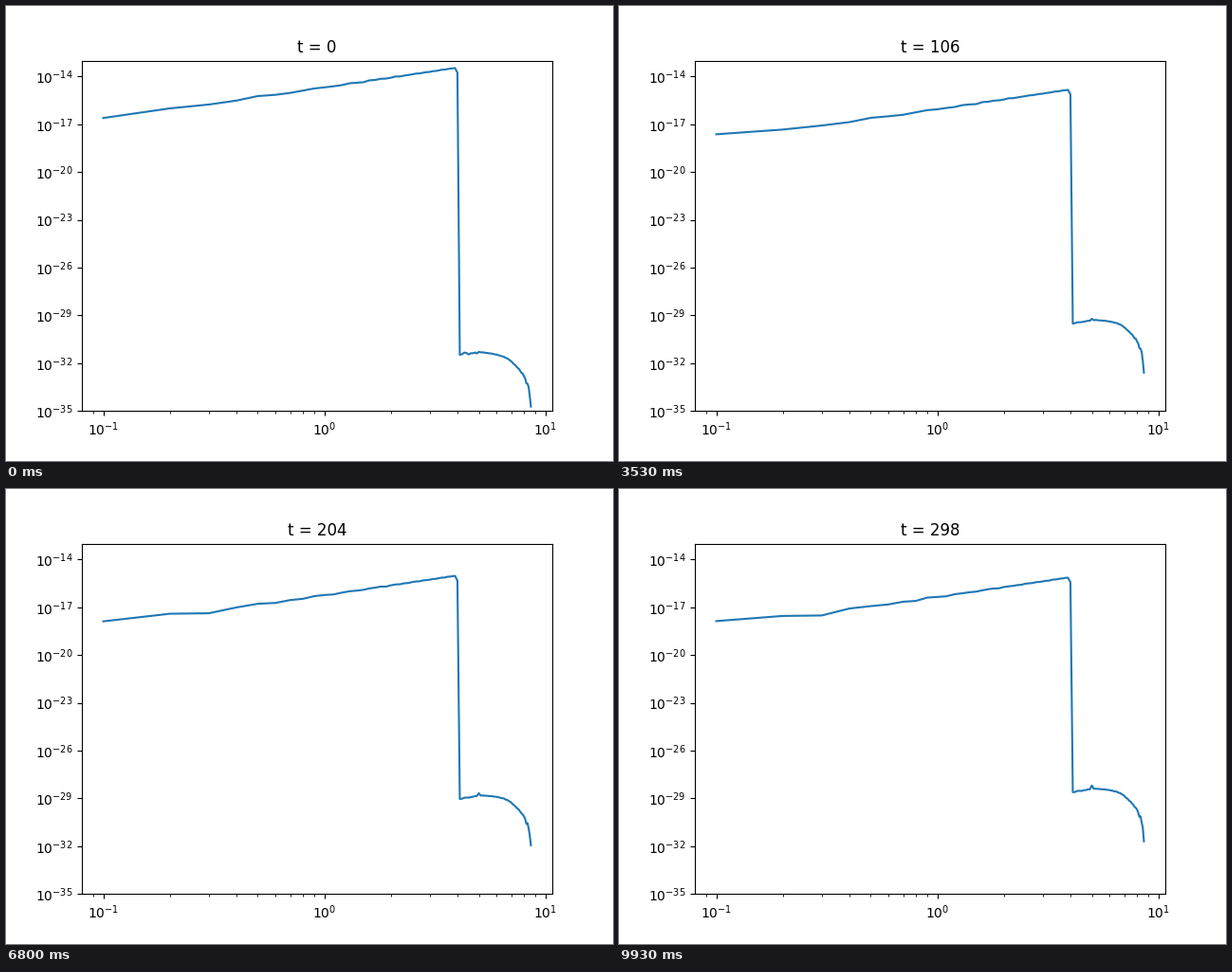
Animation of 640x480 px, one loop 9.96 s. Source, as a matplotlib script:

```python
import numpy as np
import matplotlib.pyplot as plt
from matplotlib.animation import FuncAnimation

STEPS = 299
TICK_MS = 30
TICKS = 332
HALF = 50       # modes per half axis of the cubic grid
CUT = 40        # modes beyond this radius start almost empty
SHELLS = 86


def count_modes():
    """Count the grid modes per unit shell, inside and outside the cut."""
    full = np.arange(-HALF, HALF)
    half = np.arange(HALF + 1)
    x, y, z = np.meshgrid(full, full, half, indexing="ij", sparse=True)
    radius = np.sqrt(x**2 + y**2 + z**2)
    inside = radius <= CUT
    return [np.bincount(np.rint(radius[part]).astype(int), minlength=SHELLS + 2)
            [1:SHELLS + 1] for part in (inside, ~inside)]


def build_spectra():
    """Energy per shell, one row per step."""
    n = np.arange(STEPS)[:, None]
    u = np.log10(n + 1)
    shell = np.arange(1, SHELLS + 1)
    inner, outer = count_modes()
    counts = np.where(shell <= CUT, inner, outer)
    log_counts = np.log10(counts)
    log_shell = np.log10(shell)

    def relative(ref, slope):
        """Decades above the reference shell for a power law per mode."""
        return (log_counts - log_counts[ref - 1]
                + slope * (log_shell - log_shell[ref - 1]))

    # Inner modes decay as a power of time, the largest scale a bit slower.
    settled = 1 - np.exp(-n / 15)
    head = -13.47 - 0.675 * u + relative(39, 0.1) + 0.3 * settled / shell**2

    # Outer modes grow by accumulated rounding.
    times = np.array([0, 12, 35, 62, 106, 179, 298])
    levels = [-31.37, -31.3, -30.48, -29.81, -29.32, -28.99, -28.42]
    level = np.interp(u, np.log10(times + 1), levels)
    tail = level + relative(55, 0.6 - 0.9 * (1 - settled))
    rough = np.random.default_rng(4).normal(0, 0.05, 10)
    tail[:, CUT:HALF] += rough * (1 - 0.7 * settled)
    tail[:, HALF - 1] += 0.2 * n[:, 0] / STEPS

    # Shells with few modes fluctuate most.
    wobble = 0.55 / np.sqrt(counts) * np.cos(6 * u + 2.4 * shell)
    return 10 ** (np.where(shell <= CUT, head, tail) + wobble)


def step_at(ms):
    """Three steps per 100 ms, lasting 30, 30 and 40 ms."""
    cycle, rest = divmod(ms, 100)
    return 3 * cycle + (rest >= 30) + (rest >= 60)


spectra = build_spectra()
fig, ax = plt.subplots(figsize=(6.4, 4.8), dpi=100)
line, = ax.loglog(np.arange(1, SHELLS + 1) / 10, spectra[0])
ax.set_ylim(1e-35, 1e-13)
title = ax.set_title("t = 0")


def update(tick):
    n = step_at(tick * TICK_MS + 20)
    line.set_ydata(spectra[n])
    title.set_text(f"t = {n}")
    return line, title


anim = FuncAnimation(fig, update, frames=TICKS, interval=TICK_MS, repeat=True,
                     repeat_delay=0)
plt.show()
```
